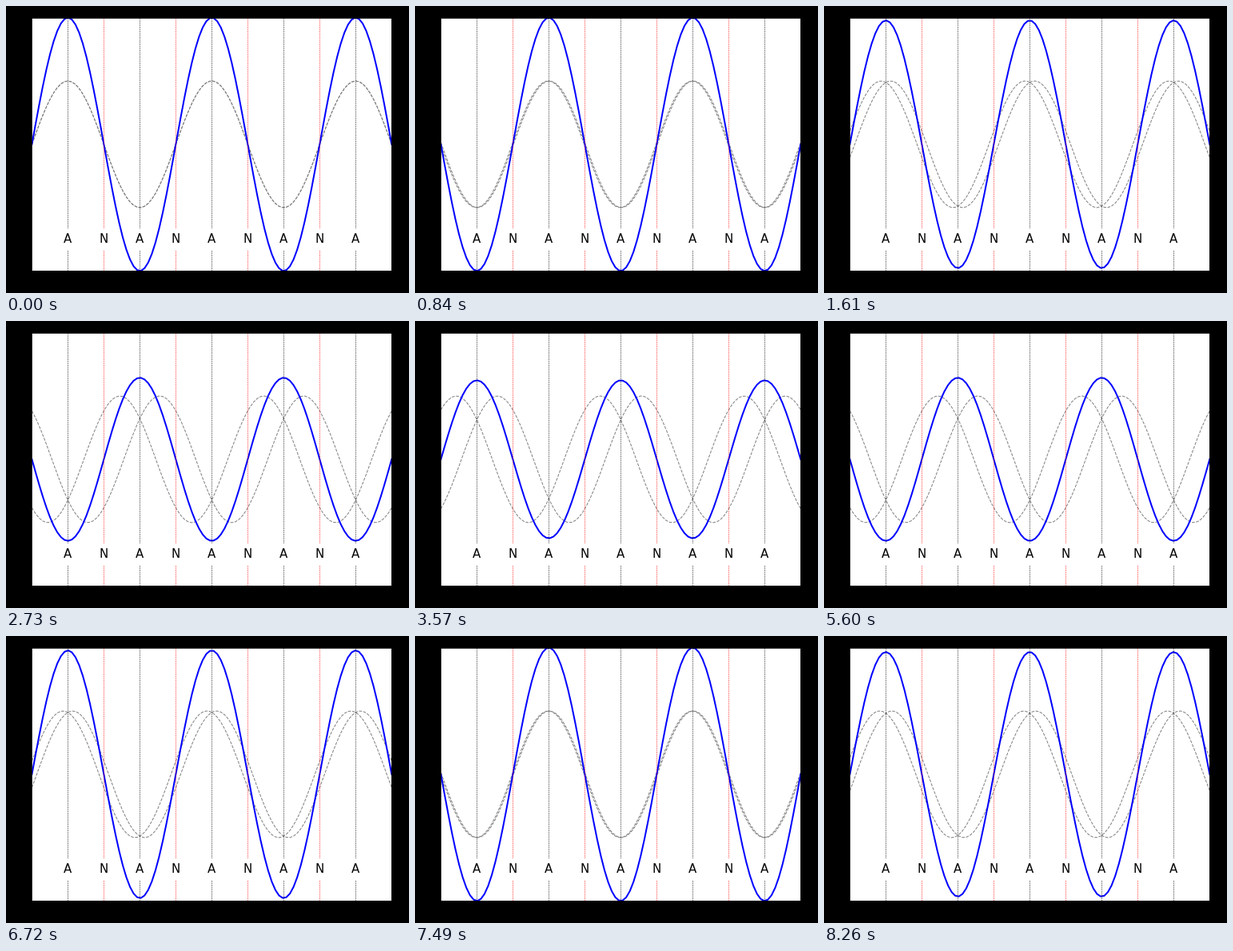
A matplotlib script that plays this animation: 504 px wide and 360 px high, repeating every 8330 ms.

```python
import numpy as np
import matplotlib.pyplot as plt
from matplotlib.animation import FuncAnimation

W, H, DPI = 504, 360, 72
FRAMES, INTERVAL, CYCLES = 119, 70, 5
LEFT, RIGHT, TOP, BOTTOM = 32.4, 482.3, 14.6, 332.3
WAVES = 2.5  # wavelengths across the axes

fig = plt.figure(figsize=(W / DPI, H / DPI), dpi=DPI, facecolor="black")
ax = fig.add_axes([LEFT / W, 1 - BOTTOM / H, (RIGHT - LEFT) / W, (BOTTOM - TOP) / H])
ax.set(xlim=(0, WAVES), ylim=(-2, 2), xticks=[], yticks=[])

x = np.linspace(0, WAVES, 100)
kx = 2 * np.pi * x
right_wave, = ax.plot([], [], "--", color="gray", lw=1)
left_wave, = ax.plot([], [], "--", color="gray", lw=1)
total, = ax.plot([], [], color="blue", lw=2)

# Antinodes and nodes alternate every quarter wavelength
for i in range(1, 10):
    pos = i / 4
    label, color = ("A", "black") if i % 2 else ("N", "red")
    ax.axvline(pos, color=color, ls="--", lw=0.5)
    ax.text(pos, -1.5, label, fontsize=15, ha="center", va="center",
            bbox=dict(boxstyle="square,pad=0.4", fc="white", ec="none"))


def update(n):
    wt = 2 * np.pi * CYCLES * n / FRAMES
    a, b = np.sin(kx - wt), np.sin(kx + wt)
    right_wave.set_data(x, a)
    left_wave.set_data(x, b)
    total.set_data(x, a + b)
    return right_wave, left_wave, total


anim = FuncAnimation(fig, update, frames=FRAMES, interval=INTERVAL,
                     repeat=True, repeat_delay=0)
plt.show()
```
